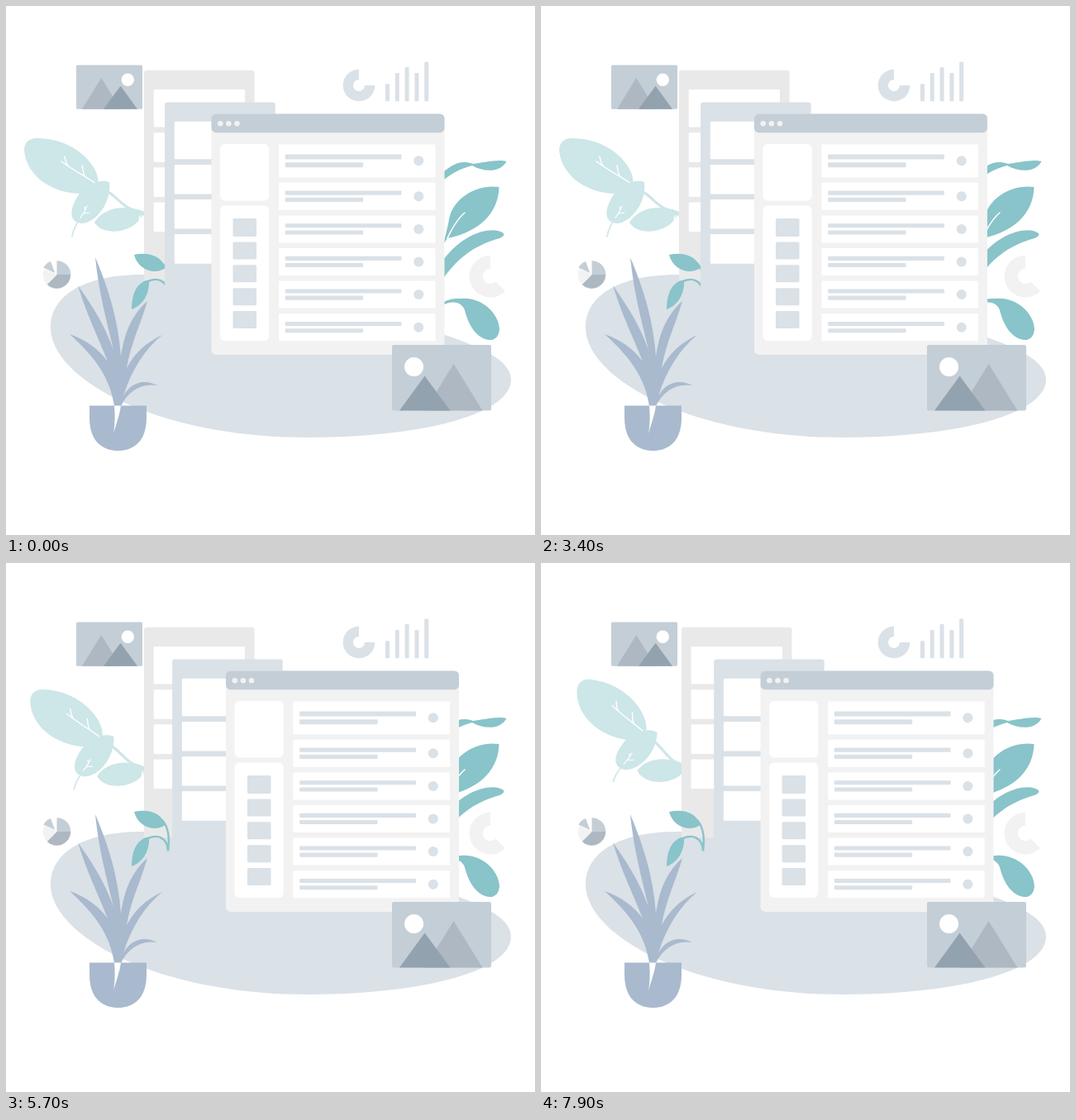
Animation, 640 px wide and 640 px high, one loop 8000 ms. Source, as an HTML page:

```html
<!DOCTYPE html>
<html lang="en">
<head>
<meta charset="utf-8">
<title>Floating windows</title>
<style>
  html, body { margin: 0; width: 100%; height: 100%; overflow: hidden; background: #fff; }
  svg { display: block; width: 100%; height: 100%; }
  .mist { fill: #dae1e7; }
  .steel { fill: #c4ced6; }
  .pale { fill: #f2f2f2; }
  .teal { fill: #88c4c9; }
  .ice { fill: #cde6e8; }
  .blue { fill: #a9bace; }
  .grey { fill: #aeb8c2; }
  .dark { fill: #93a2af; }
  .white { fill: #fff; }
  .line { fill: none; stroke-linecap: round; }
</style>
</head>
<body>
<svg viewBox="0 0 640 640" xmlns="http://www.w3.org/2000/svg">
  <defs>
    <g id="photo">
      <rect class="steel" width="80" height="53.3" rx="1.5"/>
      <path class="grey" d="M7 53.3L30.3 15.5L53.5 53.3z"/>
      <path class="dark" d="M33 53.3L53.6 25.2L74 53.3z"/>
      <circle class="white" cx="62.3" cy="17.8" r="7.7"/>
    </g>
  </defs>

  <path class="mist" d="M54 389C54 350 95 325 165 325C260 325 420 360 531 398C585 416 611 432 611 452C611 495 500 522 365 522C180 522 54 450 54 389z"/>

  <!-- charts -->
  <path class="mist" d="M427 76.7A19.3 19.3 0 1 0 446.3 96H434A7 7 0 1 1 427 89z"/>
  <g id="bars" class="mist"></g>
  <path class="pale" d="M586 301.7A25.4 25.4 0 1 0 604 345L592.5 333.6A9.2 9.2 0 1 1 586 317.7z"/>
  <path class="steel" d="M61.5 325V308.2A16.8 16.8 0 0 1 78.3 325z"/>
  <path class="grey" d="M61.5 325H78.3A16.8 16.8 0 0 1 49.6 336.9z"/>
  <path class="pale" d="M61.5 325L49.6 336.9A16.8 16.8 0 0 1 46.3 317.8z"/>
  <path class="steel" d="M59.3 323L45.3 316.6A16 16 0 0 1 54 309z"/>

  <use href="#photo" x="85" y="71.5"/>

  <!-- swaying branch -->
  <g id="branch">
    <path class="line" stroke="#cde6e8" stroke-width="3.2" d="M120 223C132 228 140 242 152 246C162 248 170 252 180 265"/>
    <path class="ice" d="M111.500 212C112 194 84 160 38 160C25 160 21 168 22.500 178C26 205 55 227 91 227C101 226 109 221 111.500 212z"/>
    <path class="ice" d="M125 213C113 208 92 217 84 235C76 250 78 262 92 263C109 262 128 238 125 213z"/>
    <path class="ice" d="M107 262C116 246 140 238 168 249C166 252 163 256 161 259C150 274 118 279 107 262z"/>
    <path class="line" stroke="#cde6e8" stroke-width="1.6" d="M92 254C85 263 81 270 80 279"/>
    <g class="line" stroke="#fff" stroke-width="1.4">
      <path d="M67 188C80 198 93 204 107 213.500M75 193C72 190 72 186 71 182M95 205C93 201 93 197 92 193"/>
      <path stroke-width="1.200" d="M98 242C96 248 94 251 90 256M94 251L101 250M96 247L95 243"/>
      <path d="M161 258L162 254"/>
    </g>
  </g>

  <g id="back" fill="#e9e9e9"></g>

  <!-- small sprig -->
  <g class="line" stroke="#88c4c9" stroke-width="2.4">
    <path stroke-linecap="butt" d="M189 311C197 320 198 334 196 348.500M170 334C183 327 195 332 196 348"/>
  </g>
  <path class="teal" d="M155 301C171 297 189 302 192.500 317C181 326 160 320 155 301z"/>
  <path class="teal" d="M152 367C152 346 160 333 173 331.500C174 345 168 361 152 367z"/>

  <!-- potted plant -->
  <path class="blue" d="M131 484C126 450 108 425 77 397C97 404 112 415 123 430C112 402 97 372 87 338C108 368 120 388 130 416C121 378 112 345 108 304C124 342 136 380 139 424C143 398 150 376 171 357C163 385 151 408 146 438C156 420 168 408 189 398C168 415 152 440 142 472C150 457 165 450 183 459C163 456 148 466 139 484z"/>
  <path class="blue" d="M101 483.500H170V498C170 525 156 538 135.500 538C115 538 101 525 101 498z"/>
  <path class="white" d="M131 483.500H139C137 497 133 506 130 517.500C132 505 132 495 131 483.500z"/>

  <!-- leaves on the right -->
  <g class="teal">
    <path d="M605.500 188C595 185 575 190 565 191C548 185 536 194 524 206V215C535 205 548 197 564 193C578 201 598 202 605.500 188z"/>
    <path d="M596.500 219C570 215 541 232 536 258C534 270 531 278 530 287L534 281C570 274 596 252 596.500 219z"/>
    <path d="M602 275C590 265 550 274 526 312V334C545 306 565 290 597 281C602 279 603 277 602 275z"/>
    <path d="M526 360C538 353 544 354 550 354C572 351 596 369 597 391C596 403 588 406 580 403C565 398 558 380 555 368C552 360 543 354 526 363z"/>
  </g>
  <path class="line" stroke="#fff" stroke-width="1.500" d="M534 281C540 268 548 256 555 250"/>

  <g id="mid" class="mist"></g>
  <g id="front" class="pale"></g>

  <use href="#photo" transform="translate(587 410) scale(-1.5 1.49)"/>
</svg>
<script>
  const $ = id => document.getElementById(id);
  const rect = (cls, x, y, w, h, r = 0) =>
    `<rect ${cls && `class="${cls}"`} x="${x}" y="${y}" width="${w}" height="${h}" rx="${r}"/>`;
  const dot = (cls, x, y, r) => `<circle class="${cls}" cx="${x}" cy="${y}" r="${r}"/>`;

  $('bars').innerHTML = [94.3, 81, 74, 81, 67.5]
    .map((y, i) => rect('', 459 + i * 11.8, y, 5, 115.3 - y, 1)).join('');

  function sheet(x, y, h) {
    let out = rect('', x, y, 133.6, h, 3);
    for (let i = 0; i < 4; i++) {
      const top = y + (i ? 33.4 + i * 42.1 : 23.3);
      out += rect('white', x + 11.7, top, 110.3, i ? 35.6 : 45.6, 1);
    }
    return out;
  }
  $('back').innerHTML = sheet(167, 77.7, 254.5);
  $('mid').innerHTML = sheet(192.1, 116.4, 256);

  function browser() {
    let out = rect('', 248.5, 130.5, 282, 291.5, 6) +
      rect('steel', 248.5, 130.5, 282, 22.7, 5.5);
    for (let i = 0; i < 3; i++) out += dot('pale', 259.3 + i * 10.1, 142.2, 3.3);
    out += rect('white', 259, 167, 59.3, 68.5, 6) + rect('white', 259, 241.5, 59.3, 163.5, 6);
    for (let i = 0; i < 5; i++) out += rect('mist', 274.5, 257 + (i && 0.6) + i * 27.85, 28.6, i ? 21 : 22, 1.5);
    for (let i = 0; i < 6; i++) {
      const y = i ? 174.2 + i * 39.6 : 167.5;
      const text = i ? y + 9.8 : 179.5;
      const thick = i ? 5.1 : 5.9;
      out += rect('white', 330, y, 189.6, i ? 33 : 39.8, 1) +
        rect('mist', 337.7, text, 140.8, thick, 1) +
        rect('mist', 337.7, text + (i ? 8.2 : 9.8), 94.4, thick, 1) +
        dot('mist', 499.3, i ? y + 16.5 : 187.3, 6);
    }
    return out;
  }
  $('front').innerHTML = browser();

  const LOOP = 8000, STEP = 100, HALF = 6700;
  // Sine sway from 0 to 1 and back, resting until its start time
  const sway = (t, start) => (1 - Math.cos(Math.PI * Math.max(0, t - start) / HALF)) / 2;
  const slide = (id, x) => $(id).setAttribute('transform', `translate(${x.toFixed(3)} 0)`);

  function draw(now) {
    const t = Math.floor(now % LOOP / STEP) * STEP;
    slide('front', 18.5 * sway(t, 0));
    slide('mid', 18.5 * sway(t, 2400));
    slide('back', 18.5 * sway(t, 6150));
    $('branch').setAttribute('transform', `rotate(${(9.8 * sway(t, 3400)).toFixed(3)} 196 329)`);
  }

  const begin = performance.now();
  function tick() {
    draw(performance.now() - begin);
    requestAnimationFrame(tick);
  }
  tick();
</script>
</body>
</html>
```
